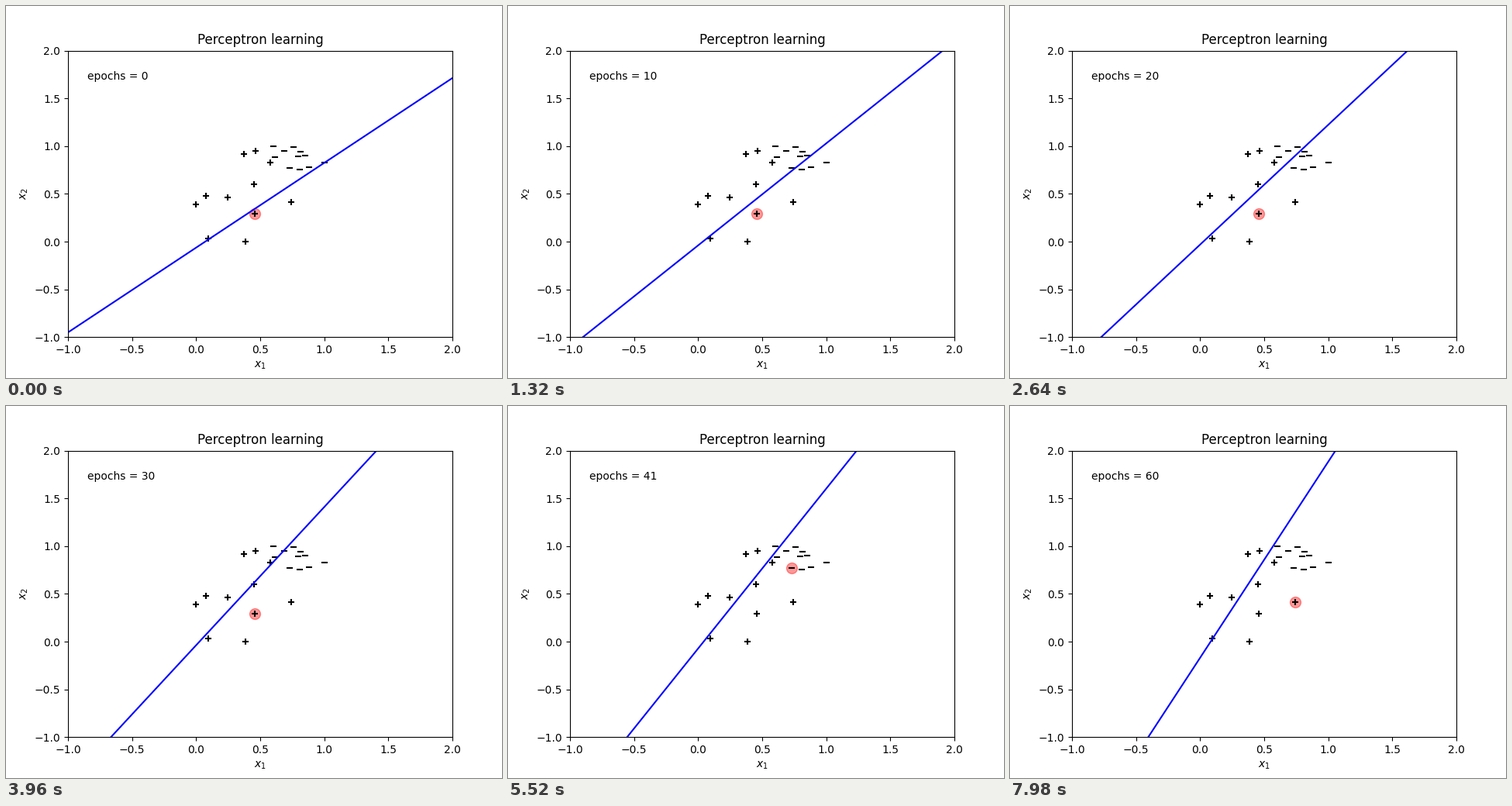
A matplotlib script that plays this animation: 640 by 480 pixels, repeating every 8000 ms.

```python
import numpy as np
import matplotlib.pyplot as plt
from matplotlib.animation import FuncAnimation

STRIDE = 10          # training samples per picture
PICTURES = 134
LO, HI = -1, 2       # both axes

# Samples in thousandths: x row, y row
plus = np.array([
    (458, 0, 77, 246, 373, 452, 464, 579, 95, 385, 742),
    (292, 390, 479, 463, 917, 601, 950, 828, 33, 0, 414)]) / 1000
minus = np.array([
    (603, 615, 688, 760, 815, 796, 851, 730, 808, 881, 1000),
    (1000, 885, 950, 990, 942, 893, 901, 771, 755, 779, 828)]) / 1000
points = np.hstack([plus, minus]).T
N = len(points)
inputs = np.column_stack([np.ones(N), points])
targets = np.where(np.arange(N) < N // 2, 1.0, -1.0)

# Height of the first line at both sides of the plot
y_left, y_right = -0.951, 1.713
slope = (y_right - y_left) / (HI - LO)
first = np.array([slope * LO - y_left, -slope, 1])

# Where the line meets the bottom and top edges later on
marks = [22, 66, 133]
goal = np.array([(-0.897, 1.909), (-0.664, 1.407), (-0.407, 1.056)])


def train(scale, rate):
    """Delta rule, one sample at a time; weights at each picture."""
    w = scale * first
    history = []
    for step in range(STRIDE * PICTURES):
        if step % STRIDE == 0:
            history.append(w)
        x = inputs[step % N]
        w = w + rate / 1000 * (targets[step % N] - w @ x) * x
    return np.array(history)


def crossings(params):
    b, wx, wy = train(*params)[marks].T
    return np.concatenate([-(b + wy * edge) / wx for edge in (LO, HI)])


def calibrate(params, rounds=6, eps=1e-4):
    """Gauss-Newton for the weight scale and learning rate."""
    for _ in range(rounds):
        base = crossings(params)
        jac = np.column_stack([(crossings(params + d) - base) / eps
                               for d in np.eye(2) * eps])
        params = params + np.linalg.lstsq(
            jac, goal.T.ravel() - base, rcond=None)[0]
    return params


weights = train(*calibrate(np.array([0.48, 0.7])))

fig, ax = plt.subplots(figsize=(6.4, 4.8), dpi=100)
ax.set(xlim=(LO, HI), ylim=(LO, HI), xlabel="$x_1$", ylabel="$x_2$",
       title="Perceptron learning")
halo, = ax.plot([], [], "ro", markersize=10, alpha=0.4, zorder=0)
ax.scatter(*plus, c="black", marker="+")
ax.scatter(*minus, c="black", marker="_")
xs = np.array([LO, HI])
line, = ax.plot(xs, xs, color="blue")
label = ax.text(-0.85, 1.7, "")


def update(i):
    k = i // 3
    epoch, sample = divmod(k * STRIDE, N)
    b, wx, wy = weights[k]
    line.set_ydata(-(b + wx * xs) / wy)
    halo.set_data(*points[sample][:, None])
    label.set_text(f"epochs = {epoch}")
    return line, halo, label


anim = FuncAnimation(fig, update, frames=400, interval=20,
                     init_func=lambda: update(0), repeat=True, repeat_delay=0)
plt.show()
```
